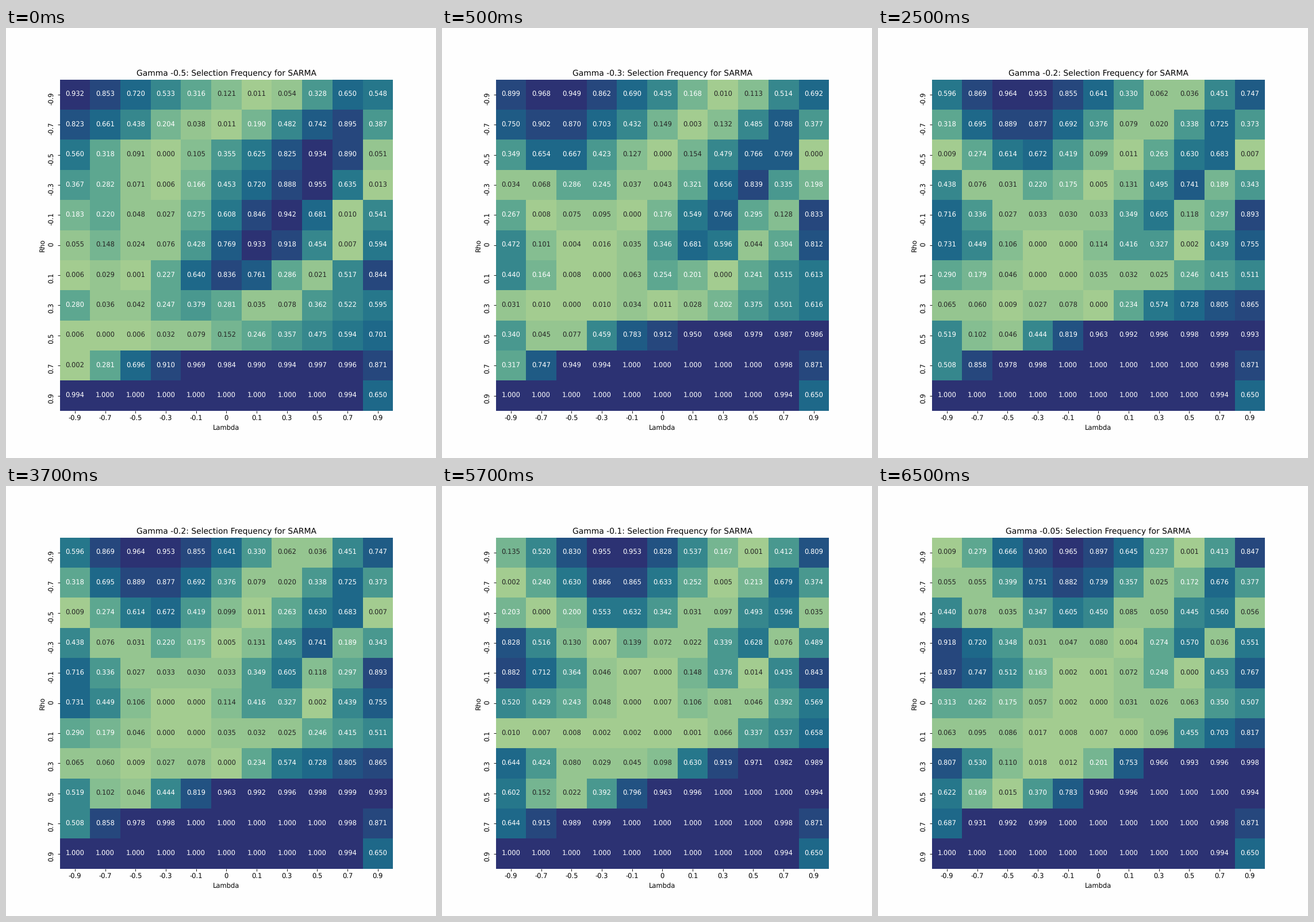
Animation, 748 px wide and 748 px high, one loop 8 s. Source, as a matplotlib script:

```python
import matplotlib.pyplot as plt
import numpy as np
from matplotlib.animation import FuncAnimation
from matplotlib.colors import BoundaryNorm, LinearSegmentedColormap, ListedColormap

SIZE = 748
TICKS = ["-0.9", "-0.7", "-0.5", "-0.3", "-0.1", "0", "0.1", "0.3", "0.5", "0.7", "0.9"]
GAMMAS = ["-0.5", "-0.3", "-0.2", "-0.1", "-0.05"]
N = len(TICKS)
ROW, COL = np.mgrid[:N, :N].astype(float)

# Green-to-navy ramp reduced to a few flat bands on a 256-step scale.
RAMP = LinearSegmentedColormap.from_list("ramp", [
    "#a5cd90", "#7dba91", "#59a590", "#40908e",
    "#287a8c", "#1c6488", "#254b7f", "#2c3172"])
EDGES = np.array([0, 5, 25, 34, 56, 83, 110, 139, 163, 188, 203, 213, 236, 257])
centres = (EDGES[:-1] + EDGES[1:]) / 512
centres[0], centres[-1] = 0.01, 0.99
BANDS = ListedColormap(RAMP(centres))
WHITE_TEXT_FROM = 40


def valley(offset, low_width, high_width, depth=1):
    """Gaussian dip to 1 - depth, with its own width on either side."""
    width = np.where(offset < 0, low_width, high_width)
    return 1 - depth * np.exp(-(offset / width) ** 2)


def selection_frequency(strength):
    """Near 1 everywhere except along valleys that drift with the strength."""
    # Falling diagonal that bends as gamma grows.
    knots = [0, 2, 5, 8, 9, 10]
    centre = np.interp(ROW, knots, [8.1, 6.7, 4.5, 1.8, -2, -6])
    centre += strength ** 1.5 * np.interp(
        ROW, knots, [-4.8, -10.5, -6, -2.2, 5.4, 5.4])
    width = 1.8 + 0.7 * strength * np.maximum(6 - ROW, 0)
    diagonal = valley(COL - centre, width, width * np.minimum(0.65 + 0.15 * ROW, 1))

    # Upper left arm, sliding left at a constant rate.
    centre = np.interp(ROW, range(8), [0.4, 1.1, 2.2, 4, 4.8, 5.4, 6.2, 30])
    left_arm = valley(COL - centre + 12 * strength, 2.1, 2.1)

    # Narrow right arm.
    centre = np.interp(ROW, [0, 1, 3, 4, 5, 6, 7, 8],
                       [10.9, 10.45, 9.1, 7.9, 7.3, 5.8, 4, -30])
    width = 0.5 + 0.13 * ROW
    right_arm = valley(COL - centre - 0.8 * strength * (ROW - 1), width, width)

    # Horizontal band, moving down and fading to the right.
    level = np.interp(strength, [0.05, 0.2, 0.5], [5.8, 6.8, 8.2])
    band = valley(ROW - level + 0.06 * COL, 1.3, 0.8 - 0.5 * strength,
                  1 - 0.005 * COL ** 2)

    corner = 1 - 0.35 * np.exp(-4 * (COL - 10) ** 2 - (ROW - 10) ** 2)
    return diagonal * left_arm * right_arm * band * corner


plt.rcParams["font.family"] = "DejaVu Sans"
plt.rcParams["text.hinting"] = "none"
fig, ax = plt.subplots(figsize=(9, 9), dpi=SIZE / 9, facecolor="#fefefe")
mesh = ax.pcolormesh(np.zeros((N, N)), cmap=BANDS,
                     norm=BoundaryNorm(EDGES, BANDS.N))
ax.set(xlim=(0, N), ylim=(N, 0), xlabel="Lambda", ylabel="Rho")
ax.set_xticks(np.arange(N) + 0.5, TICKS)
ax.set_yticks(np.arange(N) + 0.5, TICKS, rotation="vertical")
ax.spines[:].set_visible(False)
title = ax.set_title("")
labels = [ax.text(col + 0.5, row + 0.5, "", ha="center", va="center")
          for row in range(N) for col in range(N)]


def draw(frame):
    gamma = GAMMAS[(frame + 3) // 4]
    freq = selection_frequency(-float(gamma))
    mesh.set_array(freq * 256)
    title.set_text(f"Gamma {gamma}: Selection Frequency for SARMA")
    for label, value in zip(labels, freq.flat):
        label.set_text(f"{value:.3f}")
        label.set_color("white" if value * 256 >= WHITE_TEXT_FROM else "#262626")
    return [mesh, title, *labels]


anim = FuncAnimation(fig, draw, frames=16, interval=500, repeat=True,
                     repeat_delay=0, blit=False)
plt.show()
```
